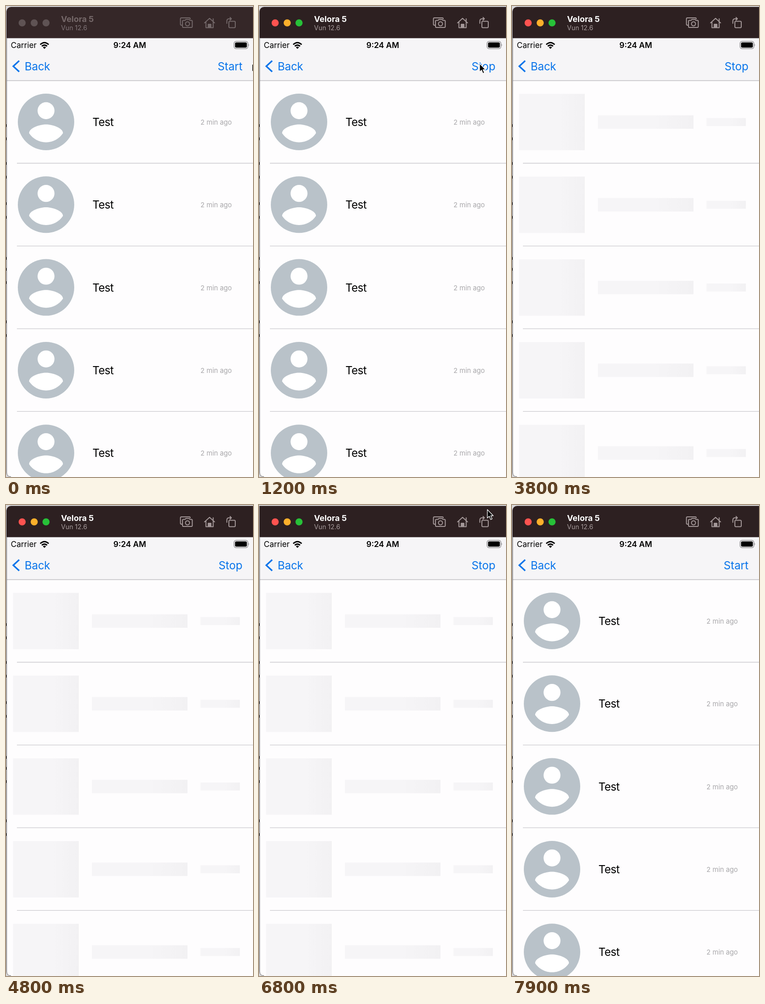
Write an HTML page that moves like this. It is 543 px wide and 1032 px high and loops after 8000 ms.

```html
<!DOCTYPE html>
<html lang="en">
<head>
<meta charset="utf-8">
<title>Skeleton list</title>
<style>
  html, body { margin: 0; width: 100%; height: 100%; overflow: hidden; background: #d9d8da; }
  svg { display: block; width: 100%; height: 100%; font-family: Inter, Roboto, sans-serif; }
  .bar { --bg: #2d2021; --icon: #a49899; --title: #fff; --sub: #a79c9d; }
  .bar.idle { --bg: #352728; --icon: #74696a; --title: #756869; --sub: #81767a; }
  .bar.idle .light { fill: #5f5354; }
  .icon { fill: none; stroke: var(--icon); stroke-width: 2; stroke-linejoin: round; stroke-linecap: round; }
  .nav { font-size: 24.3px; fill: #0874ea; }
  .name { font-size: 24.3px; letter-spacing: -.6px; }
  .ago { font-size: 14.8px; fill: #a8a7aa; }
  .status { font-size: 17.4px; }
</style>
</head>
<body>
<svg viewBox="0 0 543 1032">
  <defs>
    <linearGradient id="shine">
      <stop stop-color="#f6f5f7"/>
      <stop stop-color="#f2f1f3"/>
      <stop stop-color="#f6f5f7"/>
    </linearGradient>
    <clipPath id="window"><rect x="1" y="2" width="552" height="1031" rx="10"/></clipPath>
    <g id="person">
      <circle cx="88" cy="254" r="62" fill="#b9c2c9"/>
      <circle cx="88" cy="229.4" r="18.6" fill="#fff"/>
      <path transform="translate(13.6 179.6) scale(6.2)" fill="#fff"
        d="M12 19.2c-2.5 0-4.71-1.28-6-3.22.03-1.99 4-3.08 6-3.08 1.99 0 5.97 1.09 6 3.08-1.29 1.94-3.5 3.22-6 3.22z"/>
      <text class="name" x="190" y="263">Test</text>
      <text class="ago" x="427.5" y="260">2 min ago</text>
    </g>
    <g id="bones" fill="url(#shine)">
      <rect x="15.5" y="192.5" width="144.5" height="123.5"/>
      <rect x="189" y="239.5" width="210" height="29.5"/>
      <rect x="427.5" y="245.5" width="86.5" height="17.5"/>
    </g>
  </defs>

  <g id="specks" fill="#222"></g>
  <g clip-path="url(#window)">
    <rect width="543" height="1032" fill="#fefdfe"/>
    <g id="people"></g>
    <g id="skeleton"></g>
    <g id="lines" stroke="#cac9cd" stroke-width="1.3"></g>

    <rect y="70" width="543" height="93" fill="#f6f5f7"/>
    <path d="M0 163.5H543" stroke="#bfbec2" stroke-width="1.4"/>

    <g class="bar" id="bar">
      <rect width="543" height="70.5" fill="var(--bg)"/>
      <circle class="light" cx="35.5" cy="37" r="7.8" fill="#fe5350"/>
      <circle class="light" cx="62" cy="37" r="7.8" fill="#fdb02b"/>
      <circle class="light" cx="88" cy="37" r="7.8" fill="#27c138"/>
      <text x="121" y="34.5" font-size="18" font-weight="700" fill="var(--title)">Velora 5</text>
      <text x="121" y="52.5" font-size="14.2" fill="var(--sub)">Vun 12.6</text>
      <g class="icon">
        <path d="M387 42H385.500Q383.500 42 383.500 40V28Q383.500 26 385.500 26H403Q405 26 405 28"/>
        <path d="M390 31.500H393.500L395.500 29.500H402.500L404.500 31.500H407.500Q409.500 31.500 409.500 33.500V45Q409.500 47 407.500 47H390Q388 47 388 45V33.500Q388 31.500 390 31.500Z"/>
        <circle cx="399" cy="39" r="4.5"/>
        <path d="M436.500 37L447.500 27L458.500 37M439.500 35V47.500H455.500V35M455.500 28V33"/>
        <path d="M444.500 47V40H450.500V47Z" fill="var(--icon)"/>
        <rect x="490" y="33.500" width="14" height="14" rx="2"/>
        <path d="M485.500 38V33Q485.500 28 490.500 28H495M492.500 25L495.500 28L492.500 31"/>
      </g>
    </g>

    <text class="status" x="10.500" y="92">Carrier</text>
    <text class="status" x="272" y="92" font-weight="600" text-anchor="middle">9:24 AM</text>
    <g fill="none" stroke="#000" stroke-width="3">
      <path d="M75.200 84.500Q84.500 76 93.800 84.500M78.700 88.200Q84.500 83 90.300 88.200"/>
      <path d="M81 90.500Q84.500 87.500 88 90.500L84.500 94Z" fill="#000" stroke="none"/>
    </g>
    <rect x="501.300" y="77.500" width="30.500" height="16" rx="4.500" fill="none" stroke="#8b8a8d" stroke-width="1.400"/>
    <rect x="503.500" y="79.700" width="26" height="11.600" rx="2.700"/>
    <path d="M533.200 83Q535.500 85.500 533.200 88Z" fill="#8b8a8d"/>

    <path d="M29 120L16 132L29 144" fill="none" stroke="#0874ea" stroke-width="3.400"/>
    <text class="nav" x="41" y="140.500" letter-spacing="-.2">Back</text>
    <text class="nav" id="toggle" x="520" y="140.500" text-anchor="end">Start</text>
  </g>
  <path d="M1.500 70V1022Q1.500 1031.500 11 1031.500" fill="none" stroke="#58575a"/>
  <path id="cursor" d="M0 0V18.500L4.300 14.600L7.300 21.800L10.500 20.400L7.500 13.500H13Z"
    stroke="#fff" stroke-width="1.300" stroke-linejoin="round"/>
</svg>

<script>
const $ = id => document.getElementById(id);
const LOOP = 8000, STEP = 100, PITCH = 181.3;
const clamp = v => Math.min(1, Math.max(0, v));
const ramp = (t, a, b) => clamp((t - a) / (b - a));

const rows = [0, 1, 2, 3, 4];
const repeat = id => rows.map(i => `<use href="#${id}" y="${i * PITCH}"/>`).join("");
$("people").innerHTML = repeat("person");
$("skeleton").innerHTML = repeat("bones");
$("lines").innerHTML = rows.map(i => `<path d="M24 ${344.5 + i * PITCH}H543"/>`).join("");
$("specks").innerHTML = [259, 288, 342, 372, 430, 460, 550, 574, 603, 689, 719]
  .map(y => `<rect y="${y}" width="1" height="6"/>`).join("");

// Pointer stops: time, x, y
const visits = [
  [[0, 541, 126], [300, 511, 132], [700, 485, 126], [1300, 485, 126], [1600, 546, 122]],
  [[6700, 500, -25], [6800, 502, 10], [7000, 497, 190], [7200, 484, 125], [7600, 484, 125], [7800, 484, 1040]]
];

function pointer(t) {
  for (const path of visits)
    for (let i = 1; i < path.length; i++) {
      const [t0, x0, y0] = path[i - 1], [t1, x1, y1] = path[i];
      if (t < t0 || t > t1) continue;
      const k = (t - t0) / (t1 - t0);
      return [x0 + (x1 - x0) * k, y0 + (y1 - y0) * k];
    }
  return [-50, -50];
}

function draw(now) {
  const t = Math.floor(now % LOOP / STEP) * STEP;
  $("bar").classList.toggle("idle", t < 500);
  $("toggle").textContent = t >= 1200 && t < 7500 ? "Stop" : "Start";

  const shown = ramp(t, 1200, 1500) * (1 - ramp(t, 7600, 7900));
  $("skeleton").setAttribute("opacity", shown);
  $("people").setAttribute("opacity", 1 - shown);

  const peak = t < 7500 ? ramp(t, 1200, 1800) : .5;
  [...$("shine").children].forEach((s, i) => s.setAttribute("offset", peak + (i - 1) * .4));

  $("cursor").setAttribute("transform", `translate(${pointer(t)})`);
}

const start = performance.now();
function tick() {
  draw(performance.now() - start);
  requestAnimationFrame(tick);
}
draw(0);
requestAnimationFrame(tick);
</script>
</body>
</html>
```
